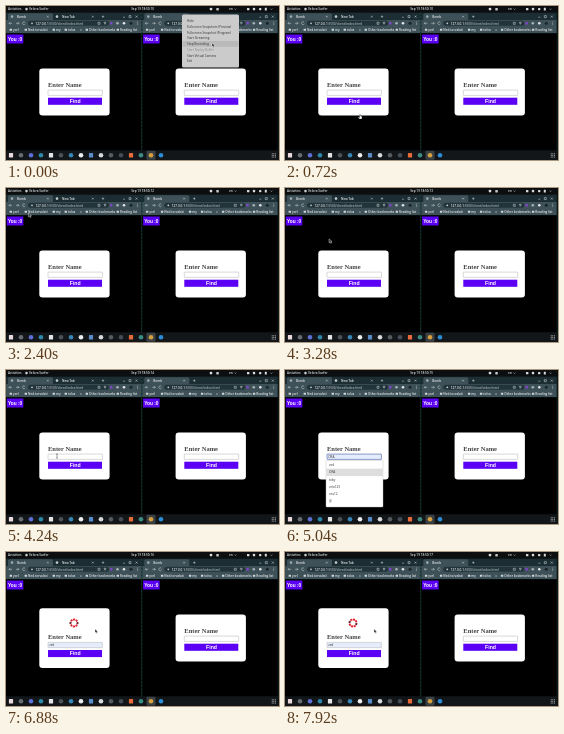
Recreate the animation shown at these times as an HTML page. Size 273x154 px, loop 8000 ms.

```html
<!DOCTYPE html>
<html lang="en">
<head>
<meta charset="utf-8">
<title>Bomb</title>
<style>
html, body { margin: 0; width: 100%; height: 100%; overflow: hidden; background: #000; }
svg { display: block; width: 100vw; height: 100vh; }
text { font-family: "Open Sans", "Noto Sans", sans-serif; font-size: 3.1px; font-weight: 600; fill: #e4e9ea; white-space: pre; }
.dark { font-weight: 400; fill: #333; }
.bold { font-family: "Liberation Sans", Arial, sans-serif; font-weight: 700; fill: #fff; }
.title { font: 700 6.5px "Liberation Serif", "Times New Roman", serif; fill: #444; }
</style>
</head>
<body>
<svg id="stage" viewBox="0 0 273 154"></svg>
<script>
const stage = document.getElementById('stage');
const rect = (x, y, w, h, fill, r = 0, more = '') =>
  `<rect x="${x}" y="${y}" width="${w}" height="${h}" rx="${r}" fill="${fill}" ${more}/>`;
const dot = (x, y, r, fill) => `<circle cx="${x}" cy="${y}" r="${r}" fill="${fill}"/>`;
const text = (x, y, s, more = '') => `<text x="${x}" y="${y}" ${more}>${s}</text>`;
const line = (d, color = '#d5dcdd', w = .5, more = '') =>
  `<path d="${d}" fill="none" stroke="${color}" stroke-width="${w}" ${more}/>`;
const group = (id, body, more = '') => `<g id="${id}" ${more}>${body}</g>`;
const purple = '#5b00f5';

function card(id) {
  return group(id,
    rect(33.3, 62.5, 70.3, 47, '#fff', 3.2, `id="${id}Box"`) +
    group(id + 'Form',
      text(42, 80.6, 'Enter Name', 'class="title"') +
      rect(42, 84.1, 54.4, 5.3, '#fff', .4, `id="${id}Input" stroke="#aaa" stroke-width=".45"`) +
      text(43.2, 87.9, '', `id="${id}Value" class="dark"`) +
      rect(42, 91.7, 54, 7.1, purple) +
      text(69.2, 97.1, 'Find', 'class="bold" text-anchor="middle" style="font-size:5.2px"')));
}

function browser(x, id, tabs) {
  let s = rect(0, 6.5, 135.3, 8, '#1c2e34') + rect(2, 7.3, 45, 8, '#3e5158', 1.5);
  tabs.forEach((name, i) => {
    const left = 5 + i * 45;
    s += dot(left + 1, 10.6, 1.3, i ? '#c3cbcd' : '#9eabae') + text(left + 6, 11.7, name) +
      line(`M${left + 36} 9.8l1.6 1.6m0-1.6l-1.6 1.6`);
  });
  const plus = 7 + tabs.length * 45;
  s += line(`M${plus - 1.2} 10.6h2.4m-1.2-1.2v2.4M117 11.2h2M123 9.6h2v2h-2zM129.5 9.6l2 2m0-2l-2 2`);
  s += rect(0, 14, 135.3, 13.3, '#3e5158') + rect(22, 14.8, 81, 5, '#22343a', 2.5);
  s += line('M6 17.3h-3l1.2-1.2m-1.2 1.2l1.2 1.2M10 17.3h3l-1.2-1.2m1.2 1.2l-1.2 1.2M19 16.3a1.4 1.4 0 1 0 .2 1.6');
  s += dot(26, 17.3, .9, '#c0c9cb') +
    text(29.5, 18.5, '127.0.0.1<tspan fill="#aab6b9">:5500/client/index.html</tspan>');
  s += line('M92 16.3h2v2h-2zM98 16.3l1 2l1-2z');
  s += rect(104, 16, 2.5, 2.5, '#7d45c9', .5) + dot(111.5, 17.3, 1.3, '#a6b2b5') +
    dot(118, 17.3, 1.3, '#e2e6e7') + dot(125, 17.3, 1.5, '#1b2528');
  s += [16, 17.3, 18.6].map(y => dot(131.5, y, .4, '#e4e9ea')).join('');
  [[7, 'yorl'], [22, 'Ned.torvalati'], [50, 'my'], [62, 'tolva'], [74, '»'],
   [83, 'Other bookmarks'], [114, 'Reading list']].forEach(([left, name]) => {
    if (name !== '»') s += rect(left - 3.4, 22.8, 2.4, 2, '#cdd5d7', .3);
    s += text(left, 25, name);
  });
  s += rect(0, 27.3, 135.3, 117.2, '#000') + rect(.8, 28.5, 16.5, 9, purple) +
    text(1.9, 34.6, 'You :0', 'class="bold" style="font-size:4.8px"');
  return group(id, s + card(id + 'Card'), `transform="translate(${x})"`);
}

function topBar() {
  return rect(0, 0, 273, 6.5, '#0c0e10') + text(2, 4.2, 'Activities') +
    dot(20.5, 3.1, 1.3, '#c9cdcd') + text(23, 4.2, 'Velora Surfer') +
    text(136.6, 4.2, '', 'id="clock" text-anchor="middle"') +
    dot(205, 3.1, 1.4, '#ddd') + rect(210.3, 1.9, 2.5, 2.5, '#c6caca', .4) +
    text(223, 4.2, 'en') + line('M228.5 2.6l1 1l1-1') +
    rect(241, 1.9, 2.4, 2.4, '#d9dcdc', .4) + dot(248, 3.1, 1.3, '#d9dcdc') +
    rect(253, 1.9, 2.4, 2.4, '#d9dcdc', .8) + rect(258.8, 1.7, 2, 2.9, '#d9dcdc', .3) +
    line('M264.5 2.6l1 1l1-1');
}

function dock() {
  const colors = ['#ead9dd', '#666c71', '#5e6fd6', '#2d87a8', '#e5e5e5', '#4b5257', '#3786b8', '#eeeeee',
    '#5a8cc9', '#d8dadb', '#555b5f', '#444c58', '#e56b3b', '#3c8c86', '#d8a13f', '#2c8dd6'];
  let s = rect(0, 144.5, 273, 9.5, '#121619') + rect(140.5, 144.8, 9, 9, '#3a4043', 1);
  colors.forEach((c, i) => {
    const x = 5 + i * 10;
    s += i % 4 ? dot(x, 149.3, 2.3, c) : rect(x - 2.1, 147.1, 4.2, 4.4, c, .6);
  });
  for (let i = 0; i < 9; i++) s += dot(266.2 + i % 3 * 1.6, 147.7 + Math.floor(i / 3) * 1.6, .5, '#d3d3d3');
  return s;
}

function trayMenu() {
  const items = ['Hide', 'Fullscreen Snapshots (Preview)', 'Fullscreen Snapshot (Program)', 'Start Streaming',
    'Stop Recording', 'Start Replay Buffer', 'Start Virtual Camera', 'Exit'];
  return rect(176, 8.5, 57, 53, '#cbcbcb', 1.5) + rect(176.5, 35, 56, 5.8, '#b9b9b9') +
    items.map((s, i) => text(181, 16.2 + i * 5.75, s, `class="dark" opacity="${i === 5 ? .4 : 1}"`)).join('');
}

function suggestions() {
  return rect(41, 90.5, 57, 46.5, '#fff', .8, 'stroke="#bbb" stroke-width=".4"') +
    rect(41.2, 98.6, 56.6, 7.5, '#dedede') +
    ['zed', 'ORA', 'toby', 'orla123', 'oru12', '@'].map((s, i) =>
      text(44, 96.2 + i * 7.2, s, 'class="dark"')).join('');
}

function spinner() {
  let s = '';
  for (let i = 0; i < 8; i++)
    s += rect(-1.1, -4.5, 2.2, 2, i % 4 === 3 ? '#6c2430' : '#e02834', .5, `transform="rotate(${i * 45})"`);
  return s;
}

const cursors = {
  arrow: '<path d="M0 0v3.8l1-.8l.7 1.5l.8-.4l-.7-1.4h1.2z" fill="#222" stroke="#fff" stroke-width=".4"/>',
  hand: '<path d="M-.4 0h.8v1.5l1.6.5v1.5l-.5 1h-2l-1.3-1.5l.4-.4l1 .5z" fill="#fff" stroke="#222" stroke-width=".3"/>',
  beam: line('M-1 -2h2M0-2v4M-1 2h2', '#444', .5)
};

stage.innerHTML = rect(0, 0, 273, 154, '#0b1a1a') +
  line('M135.8 6.5V144.5', '#2f7263', .7, 'stroke-dasharray="2.5 1"') +
  browser(0, 'left', ['Bomb', 'New Tab']) + browser(136.3, 'right', ['Bomb']) +
  topBar() + dock() +
  group('menu', trayMenu()) + group('list', suggestions()) +
  group('loader', spinner()) + group('pointer', '');

const $ = id => document.getElementById(id);
const show = (id, on) => $(id).setAttribute('display', on ? 'inline' : 'none');

// Each stop: time, x, y, cursor shape from then on.
const path = [
  [0, 206, 37, 'arrow'], [160, 206, 37, 'arrow'], [640, 75, 108.5, 'hand'], [1040, 75, 108.5, 'arrow'],
  [1760, 36, 55, 'arrow'], [2320, 22.5, 25, 'arrow'], [2720, 22.5, 25, 'arrow'], [3520, 50, 58, 'arrow'],
  [4080, 51, 86, 'beam'], [4560, 51, 86, 'beam'], [4880, 56, 102, ''], [5440, 56, 96, 'arrow'],
  [5760, 62, 93.2, 'hand'], [6240, 62, 93.2, 'arrow'], [6880, 89, 77, 'arrow'], [8000, 89, 77, 'arrow']
];

function pose(t) {
  const i = path.findIndex((p, n) => n === path.length - 1 || t < path[n + 1][0]);
  const a = path[i], b = path[i + 1] || a;
  const u = b === a ? 0 : (t - a[0]) / (b[0] - a[0]);
  const k = u * u * (3 - 2 * u);
  return { x: a[1] + (b[1] - a[1]) * k, y: a[2] + (b[2] - a[2]) * k, shape: a[3] };
}

let shape = null;
function draw(now) {
  const t = Math.floor(now % 8000 / 80) * 80;
  const listOpen = t >= 4480 && t < 5440;
  const searching = t >= 6160;
  const focused = t >= 4400 && !searching;

  $('clock').textContent = `Sep 19 18:50:${10 + Math.floor(t / 1000)}`;
  show('menu', t < 160);
  show('list', listOpen);
  show('loader', searching);
  $('loader').setAttribute('transform', `translate(68 71) rotate(${t * .36})`);

  $('leftCardBox').setAttribute('y', searching ? 56.3 : 62.5);
  $('leftCardBox').setAttribute('height', searching ? 59.7 : 47);
  $('leftCardForm').setAttribute('transform', `translate(0 ${searching ? 6.3 : 0})`);
  const input = $('leftCardInput');
  input.setAttribute('stroke', focused ? '#5468ae' : '#aaa');
  input.setAttribute('stroke-width', focused ? .65 : .45);
  input.setAttribute('fill', t >= 4880 ? '#e5edfc' : '#fff');
  $('leftCardValue').textContent = t < 4880 ? '' : listOpen ? 'ORA' : 'zed';

  const p = pose(t);
  if (p.shape !== shape) $('pointer').innerHTML = cursors[shape = p.shape] || '';
  $('pointer').setAttribute('transform', `translate(${p.x} ${p.y})`);
}

const start = performance.now();
function tick() {
  draw(performance.now() - start);
  requestAnimationFrame(tick);
}
tick();
</script>
</body>
</html>
```
